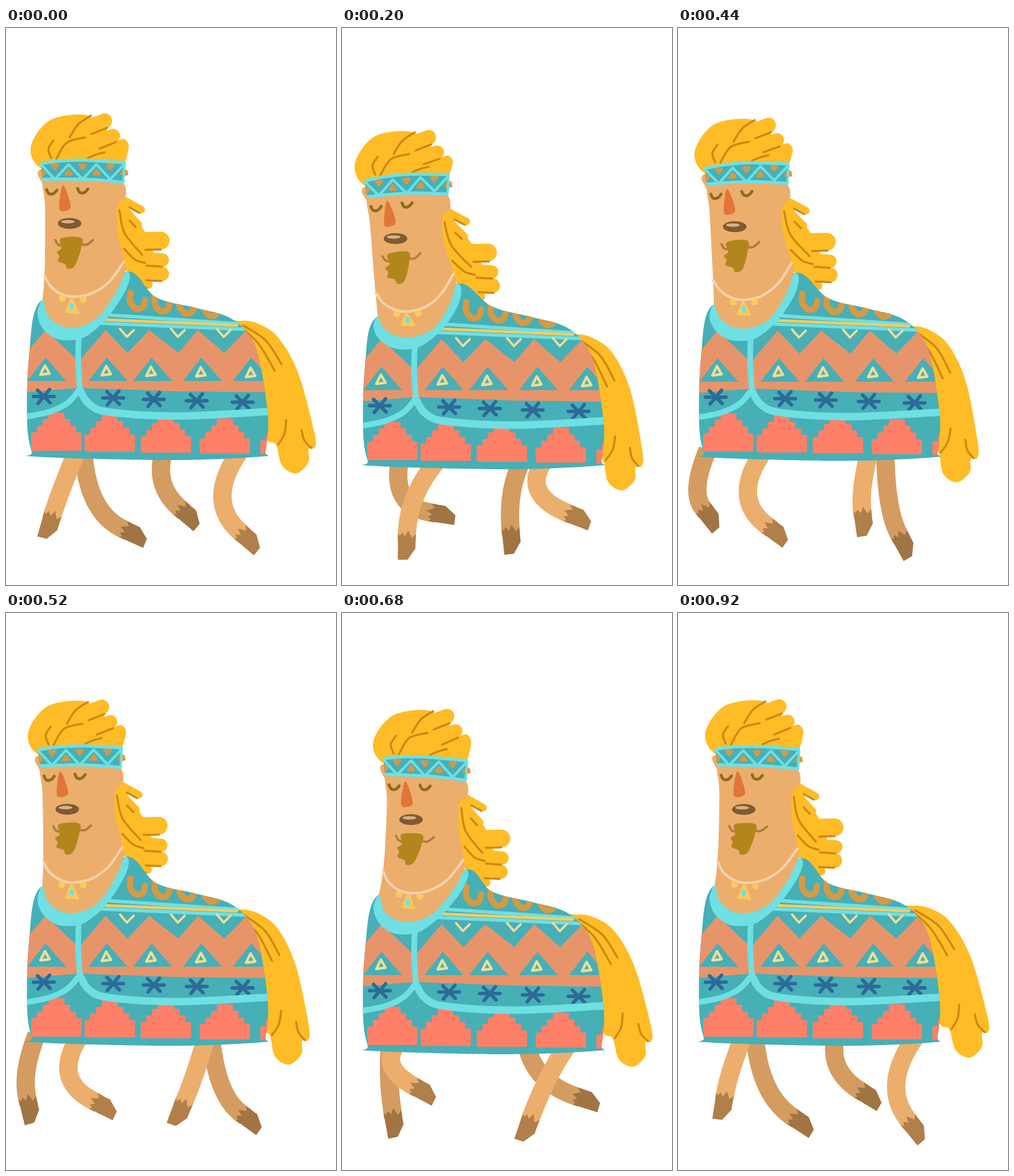
Write an HTML page with a canvas that moves like this. It is 576 by 972 pixels and loops after 960 ms.

```html
<!DOCTYPE html>
<html lang="en">
<head>
<meta charset="utf-8">
<title>Trotting poncho llama</title>
<style>
  html, body { margin: 0; width: 100%; height: 100%; overflow: hidden; background: #fff; }
  canvas { display: block; width: 576px; height: 972px; }
</style>
</head>
<body>
<canvas id="stage" width="576" height="972"></canvas>
<script>
const ctx = document.getElementById('stage').getContext('2d');
const LOOP = 960, STEP = 40;
const SKIN = '#ebae6c', SKIN_FAR = '#d49c60', HOOF = '#b07f4a', HOOF_FAR = '#a17443';
const TEAL = '#47afb6', CYAN = '#6ee0e3', HAIR = '#ffbc26', STRAND = '#cc8712';
const SALMON = '#e8946a', PINK = '#ff8068', BLUE = '#2c6a97', OCHRE = '#d69944';
const CREAM = '#f1dc94', GOLD = '#f7cb5f', LID = '#8f6b1a', SMILE = '#b07c43';

// Each joint coordinate swings as [mean, amplitude, time of peak]
const frontNear = { hip: [133, 41, 270], mid: [[108, 25, 290], [802, 15, 290]], ankle: [[118, 36, 460], [853, 32, 270]] };
const frontFar = { hip: [93, 42, 950], mid: [[94, 61, 950], [810, 14, 20]], ankle: [[120, 84, 20], [857, 24, 840]] };
const backNear = { hip: [376, 46, 850], mid: [[352, 31, 870], [806, 10, 900]], ankle: [[361, 50, 60], [862, 27, 820]] };
const backFar = { hip: [319, 43, 450], mid: [[323, 52, 520], [807, 17, 440]], ankle: [[350, 66, 595], [857, 29, 360]] };

const clamp = v => Math.max(0, Math.min(1, v));
const wave = (t, period, peak) => Math.cos((t - peak) / period * 2 * Math.PI);

let bob, sway, nod, swing;

// Maps from rest position to the pose of the moment
const body = (x, y) => [x, y + bob];

function head(x, y) {
  const bend = 1 - clamp((y - 249) / 236) ** 2;
  const stiff = clamp((232 - y) / 30);
  const arm = Math.min(x, 180) * (1 - stiff) + 80 * stiff - 166;
  const lift = nod + 0.0039 * sway * arm;
  const w = clamp((530 - y) / 60);
  return [x + sway * bend, y + bob + w * (lift - bob)];
}

const cape = (x, y) => x < 225 ? head(x, y) : body(x, y);

function tail(x, y) {
  const c = Math.cos(swing), s = Math.sin(swing), dx = x - 300, dy = y - 513;
  return [300 + dx * c - dy * s, 513 + dx * s + dy * c + bob];
}

function trace(flat, map, closed, smooth) {
  const p = [];
  for (let i = 0; i < flat.length; i += 2) p.push(map(flat[i], flat[i + 1]));
  const n = p.length;
  const at = i => closed ? p[(i + n) % n] : p[Math.max(0, Math.min(n - 1, i))];
  ctx.beginPath();
  ctx.moveTo(...p[0]);
  for (let i = 0; i < (closed ? n : n - 1); i++) {
    const [a, b, c, d] = [at(i - 1), at(i), at(i + 1), at(i + 2)];
    if (smooth) {
      ctx.bezierCurveTo(b[0] + (c[0] - a[0]) / 6, b[1] + (c[1] - a[1]) / 6,
        c[0] - (d[0] - b[0]) / 6, c[1] - (d[1] - b[1]) / 6, c[0], c[1]);
    } else ctx.lineTo(...c);
  }
  if (closed) ctx.closePath();
}

function fill(color, map, pts, smooth = true) {
  trace(pts, map, true, smooth);
  ctx.fillStyle = color;
  ctx.fill();
}

function line(color, width, map, pts, smooth = true, closed = false) {
  trace(pts, map, closed, smooth);
  ctx.strokeStyle = color;
  ctx.lineWidth = width;
  ctx.stroke();
}

function dot(color, map, x, y, rx, ry = rx) {
  ctx.beginPath();
  ctx.ellipse(...map(x, y), rx, ry, 0, 0, 7);
  ctx.fillStyle = color;
  ctx.fill();
}

// Round locks of hair, then a dark strand along each lower edge
function locks(list) {
  for (const [x1, y1, x2, y2, w] of list) line(HAIR, w, head, [x1, y1, x2, y2]);
  for (const [x1, y1, x2, y2, w] of list) {
    const dx = x2 - x1, dy = y2 - y1, k = w / 2 / Math.hypot(dx, dy);
    const ox = -dy * k, oy = dx * k;
    line(STRAND, 3.5, head, [x1 + dx * 0.4 + ox, y1 + dy * 0.4 + oy, x2 + ox, y2 + oy]);
  }
}

const strands = (map, list) => list.forEach(s => line(STRAND, 3.5, map, s));

function leg({ hip, mid, ankle }, t, skin, hoof) {
  const at = ([mean, amp, peak]) => mean + amp * wave(t, LOOP, peak);
  const hx = at(hip), hy = 735 + bob;
  const [mx, my] = mid.map(at), [ax, ay] = ankle.map(at);
  const cx = 2 * mx - (hx + ax) / 2, cy = 2 * my - (hy + ay) / 2;
  const len = Math.hypot(ax - cx, ay - cy), dx = (ax - cx) / len, dy = (ay - cy) / len;
  ctx.lineCap = 'butt';
  ctx.beginPath();
  ctx.moveTo(hx, hy);
  ctx.quadraticCurveTo(cx, cy, ax, ay);
  ctx.lineTo(ax + dx * 12, ay + dy * 12);
  ctx.strokeStyle = skin;
  ctx.lineWidth = 32;
  ctx.stroke();
  ctx.lineCap = 'round';
  const along = (a, n) => [ax + dx * a - dy * n, ay + dy * a + dx * n];
  fill(hoof, along, [1, 15.5, 47, 14, 46, -3, 26, -16, 1, -15.5, 8, -9, -5, -2, 6, 3, -1, 8, 5, 12], false);
}

function drawTail() {
  fill(HAIR, tail, [392, 520, 410, 511, 440, 516, 475, 540, 510, 602, 538, 705, 539, 732, 528, 735,
    528, 758, 507, 777, 482, 764, 471, 727, 452, 710, 435, 600]);
  strands(tail, [[405, 518, 440, 550, 469, 598], [414, 519, 454, 546, 481, 587],
    [489, 684, 486, 708, 475, 727], [516, 702, 521, 720, 533, 733]]);
}

function drawBackHair() {
  fill(HAIR, head, [198, 298, 225, 330, 250, 370, 262, 420, 248, 448, 215, 432, 185, 370]);
  locks([[207, 301, 236, 317, 13], [213, 324, 231, 343, 13], [225, 372, 270, 371, 31],
    [228, 402, 273, 405, 23], [228, 427, 272, 429, 25], [225, 432, 249, 448, 14]]);
  strands(head, [[198, 318, 207, 358, 238, 396], [206, 385, 225, 404, 243, 410]]);
}

function drawTopHair() {
  fill(HAIR, head, [64, 246, 43, 209, 75, 162, 133, 151, 165, 165, 190, 194, 207, 194, 214, 210, 196, 246, 130, 248]);
  locks([[126, 180, 172, 162, 26], [140, 207, 187, 188, 24]]);
  strands(head, [[148, 153, 126, 168, 111, 191], [138, 191, 106, 200, 88, 228],
    [83, 196, 74, 211, 79, 227], [172, 217, 157, 221, 143, 227]]);
}

function stepPyramid(x, top, base) {
  const pts = [];
  for (const side of [1, -1]) {
    const half = [];
    for (let i = 0; i < 4; i++) {
      const w = x + side * (12 + 10 * i), y = top + 2 + 11.5 * i;
      half.push([w, y], [w, i < 3 ? y + 11.5 : base]);
    }
    pts.push(...(side > 0 ? half : half.reverse()).flat());
  }
  fill(PINK, body, pts, false);
  line(PINK, 4, body, pts, false, true);
}

function star(x, y) {
  for (const [dx, dy] of [[18, 0], [11, 11], [-10, 12]]) line(BLUE, 6, body, [x - dx, y - dy, x + dx, y + dy]);
}

function drawCape() {
  const outline = [60, 477, 40, 575, 37, 690, 45, 740, 52, 748, 280, 754, 444, 748, 453, 738, 457, 675,
    440, 570, 418, 528, 385, 503, 330, 488, 262, 470, 213, 425, 140, 480];
  fill(TEAL, cape, outline);
  ctx.save();
  trace(outline, cape, true, true);
  ctx.clip();

  for (let i = 0; i < 4; i++) {
    const x = 230 + 43 * i, y = 491 + 4 * i;
    line(OCHRE, 11, body, [x - 13, y - 29, x - 13, y - 13, x - 3, y - 1, x + 9, y - 4, x + 13, y - 16]);
  }
  line(CYAN, 6, body, [182, 501, 404, 516]);
  line(CYAN, 6, body, [160, 515, 420, 526]);
  line(GOLD, 5, body, [172, 509, 403, 519]);

  const triangles = [69, 176, 254, 341, 428];
  const valleys = [127, 212, 301, 381, 470];
  const stars = [66, 187, 258, 333, 413];
  const pyramids = [88, 181, 279, 382, 488];

  const zigzag = [20, 585];
  valleys.forEach((x, i) => zigzag.push(triangles[i] - 2 * i, 527, x, i % 4 ? 567 : 582));
  fill(SALMON, body, [...zigzag, 470, 636, 300, 634, 127, 628, 20, 637], false);

  triangles.forEach((x, i) => {
    fill(TEAL, body, [x, 575, x + 36, 616, x - 32, 616], false);
    line(CREAM, 4.5, body, [x - 1, 589 + i, x + 7, 603 + i, x - 9, 605 + i], false, true);
  });
  valleys.slice(1, 4).forEach(x => line(CREAM, 4, body, [x - 13, 525, x - 1, 539, x + 11, 527], false));
  stars.forEach((x, i) => star(x, 643 + 2.5 * i));
  pyramids.forEach((x, i) => stepPyramid(x, 671 + 3.5 * i, 736 + 1.5 * i));

  line(CYAN, 10, body, [127, 538, 126, 580, 129, 632]);
  line(CYAN, 10, body, [129, 630, 108, 654, 75, 670, 30, 679]);
  line(CYAN, 13, body, [129, 632, 145, 656, 180, 670, 300, 677, 465, 669]);
  ctx.restore();
}

function drawNeck() {
  fill(SKIN, head, [66, 245, 64, 275, 68, 310, 68, 400, 66, 450, 64, 485, 75, 513, 115, 530, 150, 518,
    188, 470, 207, 428, 207, 408, 195, 355, 195, 310, 208, 297, 209, 280, 204, 266, 203, 245]);
  fill(CYAN, head, [55, 498, 64, 524, 85, 541, 112, 545, 140, 538, 175, 508, 205, 465, 216, 437, 213, 425,
    208, 427, 193, 459, 167, 498, 143, 516, 115, 523, 90, 517, 72, 500, 64, 474]);
  line('#f5d2aa', 4.5, head, [67, 432, 78, 451, 98, 465, 120, 469, 150, 463, 180, 443, 206, 408]);
  dot(GOLD, head, 98, 472, 6);
  dot(GOLD, head, 135, 474, 6);
  const pendant = [115, 472, 126, 497, 105, 495];
  fill(GOLD, head, pendant, false);
  line(GOLD, 4, head, pendant, false, true);
  dot('#71dfe0', head, 115, 486, 4, 6);
}

function drawFace() {
  for (const [x, y] of [[80, 290], [134, 288]]) line(LID, 5, head, [x - 9, y - 8, x - 5, y - 1, x + 3, y - 1, x + 9, y - 7]);
  fill('#e07638', head, [97, 279, 103, 279, 113, 311, 104, 319, 93, 315]);
  dot('#7f5a33', head, 111, 341, 20.5, 9.5);
  dot('#d5b481', head, 108, 338, 12, 3);
  line(SMILE, 4, head, [86, 370, 91, 378, 102, 381]);
  line(SMILE, 4, head, [128, 377, 141, 378, 152, 370]);
  fill('#b3861d', head, [96, 367, 131, 366, 131, 385, 120, 415, 107, 420, 103, 412, 91, 407, 93, 398, 89, 391, 97, 384]);
}

function drawBand() {
  fill(TEAL, head, [61, 236, 130, 231, 208, 235, 206, 269, 135, 264, 64, 264], false);
  const zigzag = [];
  for (let i = 0; i < 7; i++) {
    const x = 61 + 24.2 * i, odd = i % 2;
    zigzag.push(x, odd ? 264 : 238);
    if (i) {
      const up = odd ? 1 : -1, y = odd ? 242 : 252;
      line(OCHRE, 4.5, head, [x - 5, y - 3 * up, x + 5, y - 3 * up, x, y + 4 * up], false, true);
    }
  }
  line(OCHRE, 5, head, [63, 249, 67, 252, 64, 256]);
  line(CYAN, 4.5, head, zigzag, false);
  line(CYAN, 5.5, head, [64, 236, 96, 232, 140, 231, 206, 235]);
  line(CYAN, 5.5, head, [66, 264, 140, 264, 204, 269]);
  line(CYAN, 4, head, [207, 236, 205, 268]);
}

function draw(t) {
  bob = 8.6 * (1 - wave(t, 480, 0));
  nod = 12.6 * (wave(0, 480, 14) - wave(t, 480, 14));
  sway = 18.5 * (wave(0, LOOP, 280) - wave(t, LOOP, 280));
  swing = 0.0566 * (wave(t, LOOP, 330) - wave(0, LOOP, 330));

  ctx.fillStyle = '#fff';
  ctx.fillRect(0, 0, 576, 972);
  ctx.lineCap = ctx.lineJoin = 'round';
  leg(frontFar, t, SKIN_FAR, HOOF_FAR);
  leg(backFar, t, SKIN_FAR, HOOF_FAR);
  leg(frontNear, t, SKIN, HOOF);
  leg(backNear, t, SKIN, HOOF);
  drawTail();
  drawBackHair();
  drawCape();
  drawNeck();
  drawFace();
  drawTopHair();
  drawBand();
}

const start = performance.now();
function tick() {
  const t = (performance.now() - start) % LOOP;
  draw(Math.floor(t / STEP) * STEP);
  requestAnimationFrame(tick);
}
tick();
</script>
</body>
</html>
```
